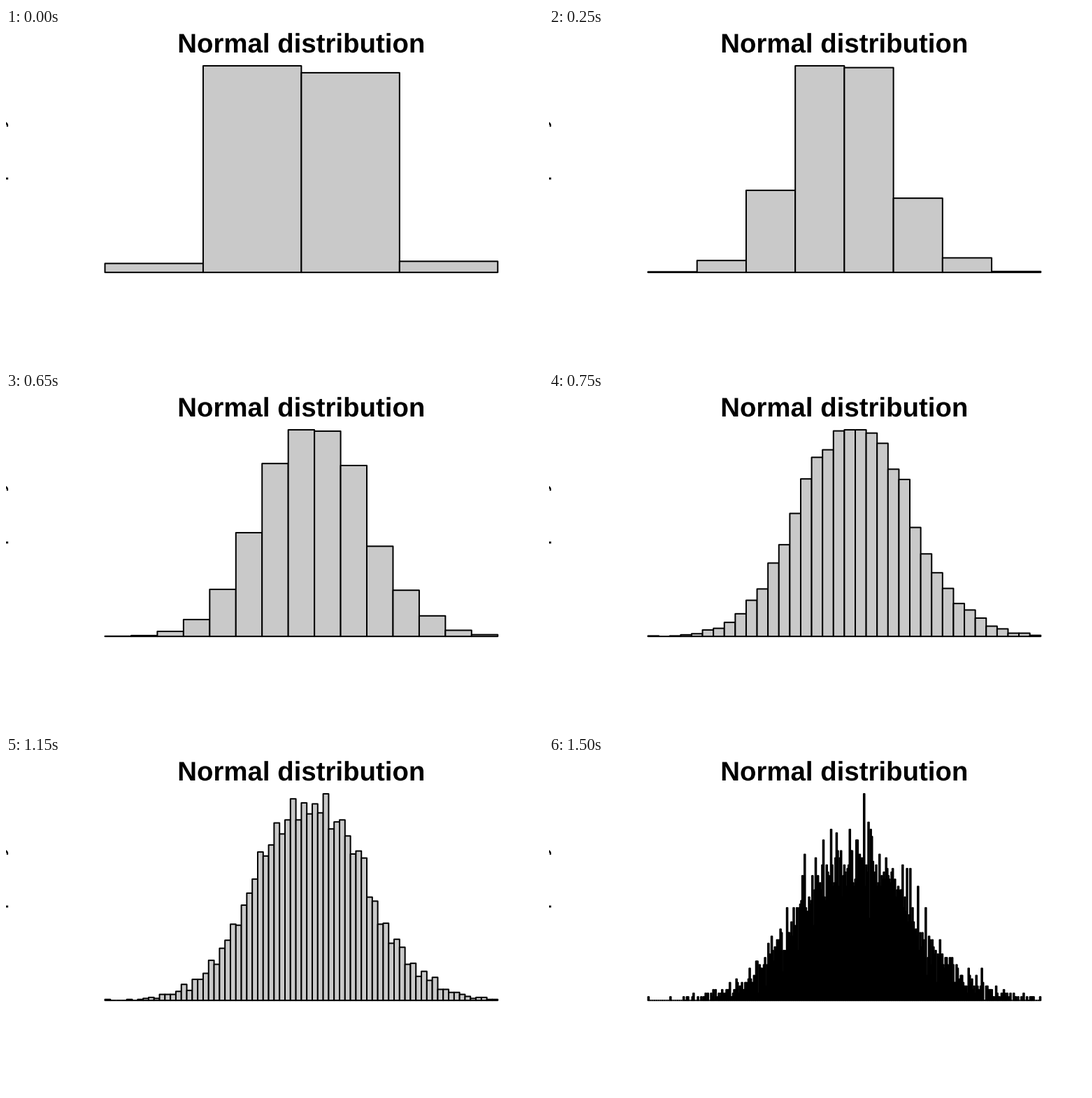
Animation of 768 by 480 pixels, one loop 1750 ms. Source, as a matplotlib script:

```python
from math import erf, sqrt

import numpy as np
import matplotlib.pyplot as plt
from matplotlib.animation import FuncAnimation
from matplotlib.collections import PolyCollection
from matplotlib.patches import PathPatch
from matplotlib.textpath import TextPath
from matplotlib.transforms import Affine2D

W, H, DPI = 768, 480, 96
LEFT, RIGHT, TOP, BASE = 141.51, 703.29, 54.04, 349.16
LOW, HIGH = -380, 334                    # data range, in hundredths
WIDTHS = [200, 100, 50, 20, 10, 5, 2]    # bin width shown at each step

# 5000 values, counted in classes 0.5 wide from -4 to 3.5
CLASSES = [1, 4, 23, 77, 215, 474, 790, 944, 938, 781, 412, 211, 94, 28, 8]


def sample():
    """Spread each class along the normal curve, with a little jitter."""
    rng = np.random.default_rng(4)
    grid = np.arange(-400, 401)
    cdf = np.array([(1 + erf(g / 100 / sqrt(2))) / 2 for g in grid])
    edges = np.clip(np.arange(-400, 351, 50), LOW, HIGH)
    parts = []
    for a, b, n in zip(edges[:-1], edges[1:], CLASSES):
        share = ((np.arange(n) + 0.5) / n + rng.normal(0, 0.08, n)) % 1
        pa, pb = np.interp([a, b], grid, cdf)
        parts.append(np.interp(pa + share * (pb - pa), cdf, grid))
    values = np.sort(np.concatenate(parts))
    values[0], values[-1] = LOW, HIGH
    return values


def histogram(values, width):
    lo = LOW // width * width
    hi = -(-HIGH // width) * width
    return np.histogram(values, np.arange(lo, hi + 1, width))[0]


def bars(counts):
    x = np.linspace(LEFT, RIGHT, len(counts) + 1)
    y = BASE - (BASE - TOP) * counts / counts.max()
    return [[(a, BASE), (a, t), (b, t), (b, BASE)]
            for a, b, t in zip(x[:-1], x[1:], y)]


def label(text, x, y, size, weight="normal", angle=0):
    """Draw text centred along its baseline at (x, y)."""
    path = TextPath((0, 0), text, size=size,
                    prop=dict(family="Liberation Sans", weight=weight))
    box = path.get_extents()
    place = (Affine2D().translate(-(box.x0 + box.x1) / 2, 0).scale(1, -1)
             .rotate_deg(-angle).translate(x, y))
    ax.add_patch(PathPatch(place.transform_path(path), fc="black", lw=0))


fig = plt.figure(figsize=(W / DPI, H / DPI), dpi=DPI, facecolor="white")
ax = fig.add_axes([0, 0, 1, 1])
ax.set(xlim=(0, W), ylim=(H, 0))
ax.axis("off")

label("Normal distribution", 422.4, 35, 38.4, weight="bold")
label("Frequency", -3.5, 200.4, 32, angle=90)

values = sample()
steps = [bars(histogram(values, w)) for w in WIDTHS]
hist = PolyCollection(steps[0], facecolor="#c9c9c9", edgecolor="black",
                      linewidth=2 * 72 / DPI, joinstyle="round", snap=False)
ax.add_collection(hist, autolim=False)


def update(i):
    hist.set_verts(steps[i])
    return [hist]


anim = FuncAnimation(fig, update, frames=len(steps), interval=250,
                     repeat=True, repeat_delay=0)
plt.show()
```
